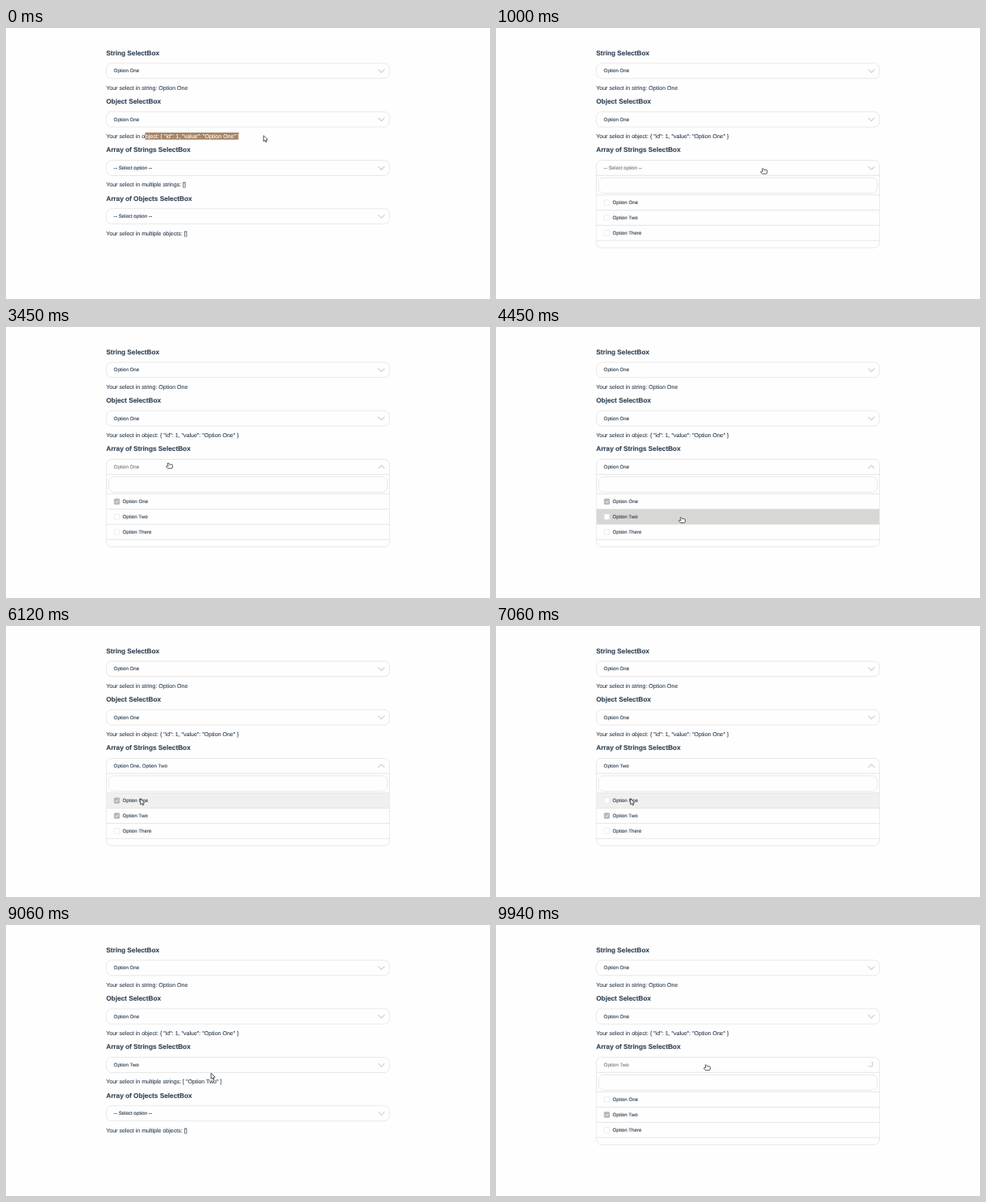
An HTML page for the animation above (10000 ms loop, 600x337 px).

```html
<!DOCTYPE html>
<html lang="en">
<head>
<meta charset="utf-8">
<title>Select boxes</title>
<style>
  html, body { margin: 0; width: 100%; height: 100%; overflow: hidden; background: #fefefe; }
  svg { display: block; width: 600px; height: 337px; }
  text {
    font: 7.05px "Liberation Sans", Arial, sans-serif;
    color: #2c3e50;
    fill: currentColor;
    stroke: currentColor;
    stroke-width: .1;
    white-space: pre;
    text-rendering: geometricPrecision;
  }
  .title { font-size: 8.26px; font-weight: bold; }
  .value { font-size: 6.2px; }
  .box { fill: #fefefe; stroke: #e2e2e2; stroke-width: .8; }
  .line { stroke: #e0e0e0; stroke-width: .8; }
  .arrow { fill: none; stroke: #cdcdcd; stroke-width: 1.1; }
  .cursor { fill: #fff; stroke: #2b2b2b; stroke-width: .8; stroke-linejoin: round; }
</style>
</head>
<body>
<svg id="stage" viewBox="0 0 600 337"></svg>
<script>
const LOOP = 10000, PRESS = 100, TURN = 300;
const LEFT = 124.4, WIDTH = 351, PITCH = 60.3;
const HEAD_TOP = 164.5, HEAD_H = 19, ROW_TOP = 207.6, ROW_H = 18.9;
const HEAD = "head", EMPTY = "-- Select option --";
const OPTIONS = ["Option One", "Option Two", "Option There"];
const stage = document.getElementById("stage");

function add(parent, tag, attrs, text) {
  const el = document.createElementNS("http://www.w3.org/2000/svg", tag);
  for (const key in attrs) el.setAttribute(key, attrs[key]);
  if (text) el.textContent = text;
  parent.append(el);
  return el;
}
const label = (parent, cls, x, y, text) => add(parent, "text", { class: cls, x, y }, text);
const show = (el, on) => { el.style.display = on ? "" : "none"; };

function addBox(y, text) {
  const rect = add(stage, "rect", { class: "box", x: LEFT, y, width: WIDTH, height: HEAD_H, rx: 6.5 });
  const value = label(stage, "value", 133.6, y + 11.6, text);
  const arrow = add(stage, "path", { class: "arrow", d: "M-4-2 0 2 4-2" });
  const turn = deg => arrow.setAttribute("transform", `translate(465.4 ${y + 9.6}) rotate(${deg})`);
  turn(0);
  return { rect, value, turn };
}

// Page content
const OBJECT = '{ "id": 1, "value": "Option One" }';
const notes = [
  ["String", OPTIONS[0], "string: " + OPTIONS[0]],
  ["Object", OPTIONS[0], "object: " + OBJECT],
  ["Array of Strings", null, ""],
  ["Array of Objects", EMPTY, "multiple objects: []"]
].map(([name, value, note], i) => {
  const y = i * PITCH;
  label(stage, "title", 124.2, y + 33.7, name + " SelectBox");
  if (value) addBox(y + 43.8, value);
  return label(stage, "", 124.2, y + 76.8, "Your select in " + note);
});

// Highlighted part of the second note
const marked = add(stage, "g", {});
add(marked, "rect", { x: 172.5, y: 130, width: 116.2, height: 8.8, fill: "#a78567" });
label(marked, "", 172.8, 76.8 + PITCH, "bject: " + OBJECT).style.color = "#fff";

// Live select box
const live = addBox(HEAD_TOP, EMPTY);
const panel = add(stage, "g", {});
const rows = OPTIONS.map((name, i) => {
  const y = ROW_TOP + i * ROW_H;
  const back = add(panel, "rect", { x: LEFT + .3, y, width: WIDTH - .6, height: ROW_H });
  const check = add(panel, "rect", { x: 134.2, y: y + 6.2, width: 6.5, height: 6.6, rx: .8, "stroke-width": .7 });
  const tick = add(panel, "path", {
    d: `M135.8 ${y + 9.5}l1.3 1.3 2.2-2.4`, fill: "none", stroke: "#fff", "stroke-width": .9
  });
  label(panel, "value", 144.5, y + 11.8, name);
  return { back, check, tick };
});
for (let i = -1; i <= OPTIONS.length; i++) {
  const y = i < 0 ? HEAD_TOP + HEAD_H - .2 : ROW_TOP + i * ROW_H;
  add(panel, "line", { class: "line", x1: LEFT, x2: LEFT + WIDTH, y1: y, y2: y });
}
add(panel, "rect", { class: "box", x: 127.2, y: 186.2, width: 345.6, height: 19.2, rx: 6.5 });

const pointer = add(stage, "path", { class: "cursor", d: "M0 0V7.2L1.7 5.7 2.8 8.2 4 7.7 3 5.2 5.1 5Z" });
const hand = add(stage, "path", {
  class: "cursor",
  d: "M-1.2.6Q-.4-.5.5.5L1.5 2H4.2Q5.2 2.2 5.2 3.2L4.9 6Q4.7 6.8 4 6.8H-.4Q-1.2 6.7-1.6 6.1L-2.8 4.6Q-2.9 3.5-1.5 3.7L-.2 3.9Z"
});

// Cursor moves: start, end, x, y
const START = [319.3, 133.8];
const moves = [
  [270, 790, 331, 174.5],
  [1240, 2060, 219.7, 218],
  [2500, 2800, 226, 241],
  [2800, 3300, 201.4, 169],
  [3500, 4270, 229.5, 236.6],
  [5060, 5610, 220.5, 217],
  [6000, 6120, 166.7, 214.8],
  [7060, 7450, 188.2, 168.6],
  [7670, 8000, 110, 160.7],
  [8200, 8420, 205, 173],
  [8870, 9230, 295, 193.5],
  [9230, 9670, 260.4, 173.8]
];
const clicks = [330, 1000, 2270, 4450, 6450, 8420, 9885];

const clamp = v => Math.min(1, Math.max(0, v));
const smooth = p => p * p * (3 - 2 * p);

function cursorAt(t) {
  let [x, y] = START;
  for (const [from, to, toX, toY] of moves) {
    const p = smooth(clamp((t - from) / (to - from)));
    x += (toX - x) * p;
    y += (toY - y) * p;
  }
  return [x, y];
}

// What lies under the cursor: the head, a row number or nothing
function hit([x, y], open) {
  if (x < LEFT || x > LEFT + WIDTH) return null;
  if (y > HEAD_TOP && y < HEAD_TOP + HEAD_H) return HEAD;
  const row = Math.floor((y - ROW_TOP) / ROW_H);
  return open && row in OPTIONS ? row : null;
}

// Replays the clicks up to a time
function stateAt(t) {
  const state = { open: false, toggled: -TURN, picked: new Set(), pressed: null, clicked: false };
  for (const at of clicks) {
    if (at > t) break;
    const target = hit(cursorAt(at), state.open);
    state.clicked = true;
    if (target === HEAD) {
      state.open = !state.open;
      state.toggled = at;
    } else if (target !== null) {
      if (t < at + PRESS) state.pressed = target;
      else if (!state.picked.delete(target)) state.picked.add(target);
    }
  }
  return state;
}

function draw(t) {
  const pos = cursorAt(t);
  const { open, toggled, picked, pressed, clicked } = stateAt(t);
  const over = hit(pos, open);
  const names = OPTIONS.filter((_, i) => picked.has(i));

  live.value.textContent = names.join(", ") || EMPTY;
  live.value.style.color = over === HEAD ? "#7b7b7b" : "";
  live.rect.setAttribute("height", open ? 108.8 : HEAD_H);
  const turned = Math.sin(clamp((t - toggled) / TURN) * Math.PI / 2);
  live.turn(-180 * (open ? turned : 1 - turned));
  const list = names.map(name => `"${name}"`).join(", ");
  notes[2].textContent = `Your select in multiple strings: ${list ? `[ ${list} ]` : "[]"}`;

  show(panel, open);
  rows.forEach(({ back, check, tick }, i) => {
    const on = picked.has(i);
    back.setAttribute("fill", i === pressed ? "#d7d7d5" : i === over ? "#f0f0ef" : "#fefefe");
    check.setAttribute("fill", on ? "#b7b7b7" : "#fff");
    check.setAttribute("stroke", on ? "#b0b0b0" : "#e4e4e4");
    show(tick, on);
  });

  // Row labels keep the plain pointer
  const onLabel = over !== HEAD && pos[0] < 180;
  const useHand = over !== null && !onLabel;
  show(marked, !clicked);
  show(hand, useHand);
  show(pointer, !useHand);
  (useHand ? hand : pointer).setAttribute("transform", `translate(${pos})`);
}

const start = performance.now();
function frame() {
  draw((performance.now() - start) % LOOP);
  requestAnimationFrame(frame);
}
frame();
</script>
</body>
</html>
```
